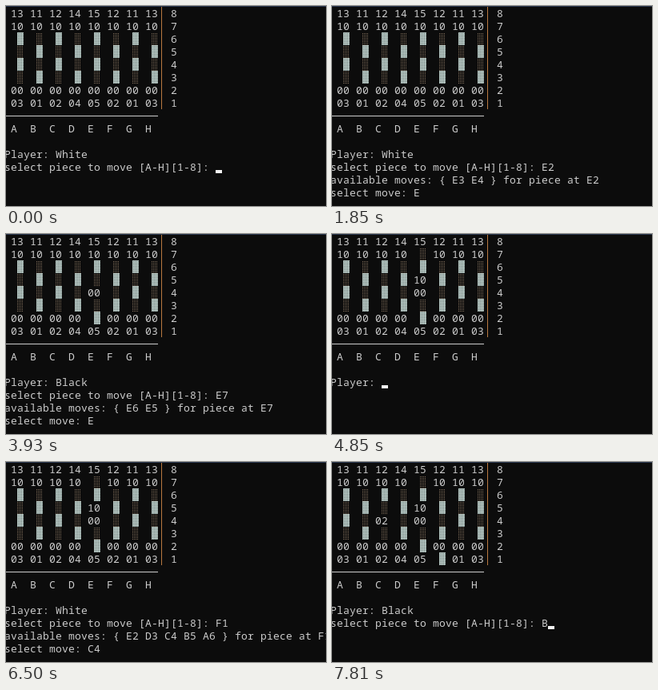
Write an HTML page that moves like this. It is 400 px wide and 250 px high and loops after 8 s.

```html
<!DOCTYPE html>
<html lang="en">
<head>
<meta charset="utf-8">
<title>Console chess</title>
<style>
  html, body { margin: 0; width: 100%; height: 100%; overflow: hidden; background: #0c0c0c; }
  #stage { position: relative; width: 400px; height: 250px; overflow: hidden; background: #0c0c0c; }
  #stage > *, #board > * { position: absolute; }
  #edge { left: 0; top: 0; width: 400px; height: 1px; background: #2b3950; }
  #board { left: 0; top: 0; }
  pre {
    margin: 0; left: -2px; color: #ccc;
    font: 13px/16px "Noto Sans Mono", "DejaVu Sans Mono", monospace;
    letter-spacing: calc(8px - 1ch);
  }
  #grid { top: 1px; }
  #log { top: 177px; }
  #side { left: 194px; top: 1px; width: 1px; height: 128px; background: #b87840; }
  #base { left: 0; top: 137px; width: 190px; height: 1px; background: #ccc; }
  #cursor { width: 8px; height: 4px; background: #f2f2f2; }
  i { display: inline-block; width: 8px; height: 16px; vertical-align: top; background-size: 2px 2px; }
  .dim { background-image: conic-gradient(#0c0c0c 25%, #0c0c0c 0 50%, #85725e 0 75%, #0c0c0c 0); }
  .lit { background-image: conic-gradient(#b9cac6 25%, #5d6b68 0 50%, #b9cac6 0); }
</style>
</head>
<body>
<div id="stage">
  <div id="edge"></div>
  <div id="board">
    <pre id="grid"></pre>
    <div id="side"></div>
    <div id="base"></div>
  </div>
  <pre id="log"></pre>
  <div id="cursor"></div>
</div>
<script>
const LOOP = 8000;
const $ = id => document.getElementById(id);
const ASK = 'select piece to move [A-H][1-8]: ';
const options = (at, list) => `\navailable moves: { ${list} } for piece at ${at}\nselect move: `;

// Board as a map from square name to piece code
const pieces = {};
[...'ABCDEFGH'].forEach((f, i) => {
  const rank = '31245213'[i];
  Object.assign(pieces, { [f + 8]: '1' + rank, [f + 7]: '10', [f + 2]: '00', [f + 1]: '0' + rank });
});
const boards = [pieces];
for (const [from, to] of [['E2', 'E4'], ['E7', 'E5'], ['F1', 'C4']]) {
  const next = { ...boards.at(-1) };
  next[to] = next[from];
  delete next[from];
  boards.push(next);
}

function boardHTML(board) {
  let out = '';
  for (let r = 8; r > 0; r--) {
    [...'ABCDEFGH'].forEach((f, i) => {
      const shade = (i + r) % 2 ? 'dim' : 'lit';
      out += ' ' + (board[f + r] || ` <i class="${shade}"></i>`);
    });
    out += `  ${r}\n`;
  }
  return out + '\n A  B  C  D  E  F  G  H';
}
const views = boards.map(boardHTML);

// Console states, each following from the one before
const states = [];
const push = (time, turn, text, cursor) => states.push({ time, turn, text, cursor });
const type = (time, add) => { const s = states.at(-1); push(time, s.turn, s.text + add, true); };
const blink = time => { const s = states.at(-1); push(time, s.turn, s.text, false); };

push(0, 0, 'Player: White\n' + ASK, true);
blink(250);
type(370, 'E');
blink(800);
type(860, '2');
type(1170, options('E2', 'E3 E4'));
type(1480, 'E');
blink(1850);
type(1970, '4');

push(2280, 1, 'Player: ', true);
type(2340, 'Black\n');
type(2390, ASK);
type(2950, 'E');
type(3260, '7');
blink(3440);
type(3500, '\n');
push(3560, 1, 'Player: Black\n' + ASK + 'E7' + options('E7', 'E6 E5'), true);
type(3810, 'E');
blink(3930);
type(4170, '5');
blink(4420);

push(4850, 2, 'Player: ', true);
type(4910, 'White\n');
type(5030, ASK);
type(5400, 'F');
blink(5460);
type(5520, '1');
type(5580, options('F1', 'E2 D3 C4 B5 A6'));
type(5760, 'C');
blink(6010);
type(6440, '4');
blink(6500);

push(6940, -1, '', false);
push(7000, 3, 'Player: ', true);
type(7060, 'Black\n' + ASK);
blink(7560);
type(7810, 'B');

let shown;
function draw() {
  const now = performance.now() % LOOP;
  const s = states.findLast(s => s.time <= now);
  if (s !== shown) {
    const lines = s.text.split('\n');
    $('board').style.display = s.turn < 0 ? 'none' : '';
    if (s.turn >= 0 && s.turn !== shown?.turn) $('grid').innerHTML = views[s.turn];
    $('log').textContent = s.text;
    const c = $('cursor').style;
    c.display = s.cursor ? '' : 'none';
    c.left = lines.at(-1).length * 8 - 2 + 'px';
    c.top = 173 + lines.length * 16 + 'px';
    shown = s;
  }
  requestAnimationFrame(draw);
}
draw();
</script>
</body>
</html>
```
